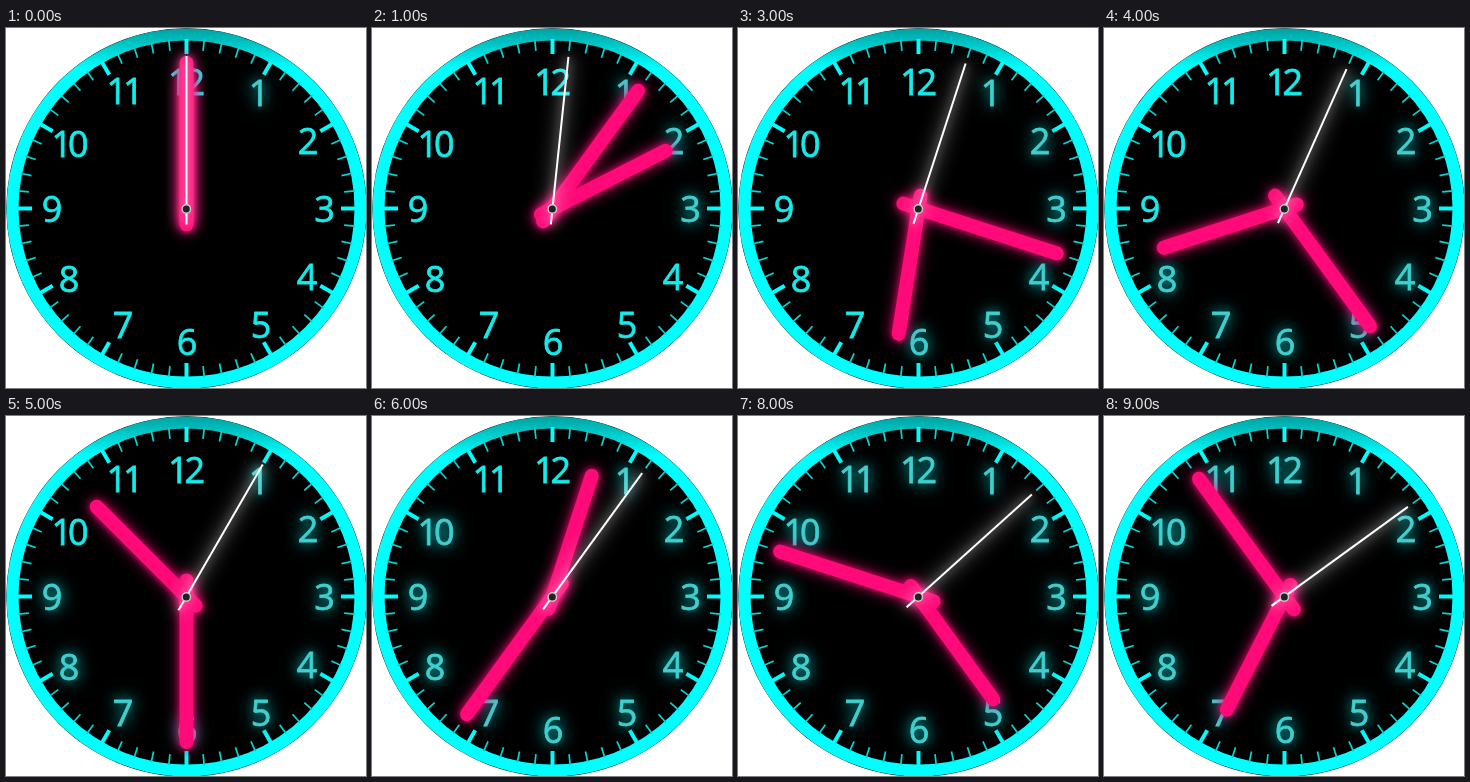
An HTML page that plays this animation: 360 px wide and 360 px high, repeating every 10000 ms.

```html
<!DOCTYPE html>
<html lang="en">
<head>
<meta charset="utf-8">
<title>Neon clock</title>
<style>
  html, body { margin: 0; width: 100%; height: 100%; overflow: hidden; background: #fff; }
  svg { display: block; width: 100vw; height: 100vh; }
  text {
    font: 36px "Open Sans", "Noto Sans", sans-serif;
    letter-spacing: -4px;
    text-anchor: middle;
    fill: #14ebeb;
    stroke: #14ebeb;
    stroke-width: .8;
  }
  text.lit {
    fill: #3fcfcf;
    stroke: #3fcfcf;
    filter: drop-shadow(0 0 4px #00808080) drop-shadow(0 0 8px #009c9c);
  }
  .tick { stroke: #00d8d8; stroke-width: 1.7; }
  .tick.major { stroke: #0ff; stroke-width: 4; }
  .hand { stroke: #ff0a78; stroke-width: 14; stroke-linecap: round; }
  .glow { filter: drop-shadow(0 0 3px #ff0a78a0) drop-shadow(0 0 7px #ff0a78b0); }
  #second { stroke: #fff; stroke-width: 2; }
  .shine { filter: drop-shadow(0 0 4px #fff8) drop-shadow(0 0 9px #fff); }
</style>
</head>
<body>
<svg viewBox="0 0 360 360">
  <defs>
    <linearGradient id="rim" gradientUnits="userSpaceOnUse" x1="0" y1="0" x2="0" y2="40">
      <stop offset="0" stop-color="#00a0a0"/>
      <stop offset="1" stop-color="#0ff"/>
    </linearGradient>
  </defs>
  <circle cx="180.5" cy="180.5" r="180.2"/>
  <circle cx="180.5" cy="180.5" r="174" fill="none" stroke="url(#rim)" stroke-width="12"/>
  <g id="ticks"></g>
  <g id="digits"></g>
  <g class="glow"><path id="hour" class="hand" d="M180.5 193.5V53.5"/></g>
  <g class="glow"><path id="minute" class="hand" d="M180.5 196.5V35"/></g>
  <g class="shine"><path id="second" d="M180.5 196.5V28"/></g>
  <circle cx="180.3" cy="181" r="4.2" fill="#222" stroke="#ccc" stroke-width="1.4"/>
</svg>
<script>
  const byId = id => document.getElementById(id);
  const turn = degrees => `rotate(${degrees} 180.5 180.5)`;

  function add(parent, tag, attrs) {
    const node = document.createElementNS("http://www.w3.org/2000/svg", tag);
    for (const key in attrs) node.setAttribute(key, attrs[key]);
    return byId(parent).appendChild(node);
  }

  for (let i = 0; i < 60; i++) {
    const major = i % 5 === 0;
    add("ticks", "path", {
      class: major ? "tick major" : "tick",
      d: `M180.5 11V${major ? 26 : 22}`,
      transform: turn(i * 6)
    });
  }

  // Each numeral: label, x, middle y, second at which it starts to glow.
  const numerals = [
    [12, 178.5, 53.5, 7], [1, 251, 64.5, 0], [2, 300, 113, 1], [3, 316.5, 181, 1],
    [4, 299, 249, 2], [5, 253, 297, 2], [6, 179, 314, 3], [7, 115, 297, 4],
    [8, 61, 251, 4], [9, 44, 181, 5], [10, 62, 115.5, 6], [11, 117, 62.5, 7]
  ].map(([label, x, y, litAt]) => {
    const node = add("digits", "text", { x, y: y + 13 });
    node.textContent = label;
    return { node, litAt };
  });

  const degreesPerSecond = { hour: 63, minute: 36, second: 6 };
  let shown = -1;

  function draw() {
    const sec = Math.floor(performance.now() / 1000) % 10;
    if (sec !== shown) {
      shown = sec;
      for (const id in degreesPerSecond)
        byId(id).setAttribute("transform", turn(sec * degreesPerSecond[id]));
      for (const { node, litAt } of numerals) node.classList.toggle("lit", sec >= litAt);
    }
    requestAnimationFrame(draw);
  }
  draw();
</script>
</body>
</html>
```
